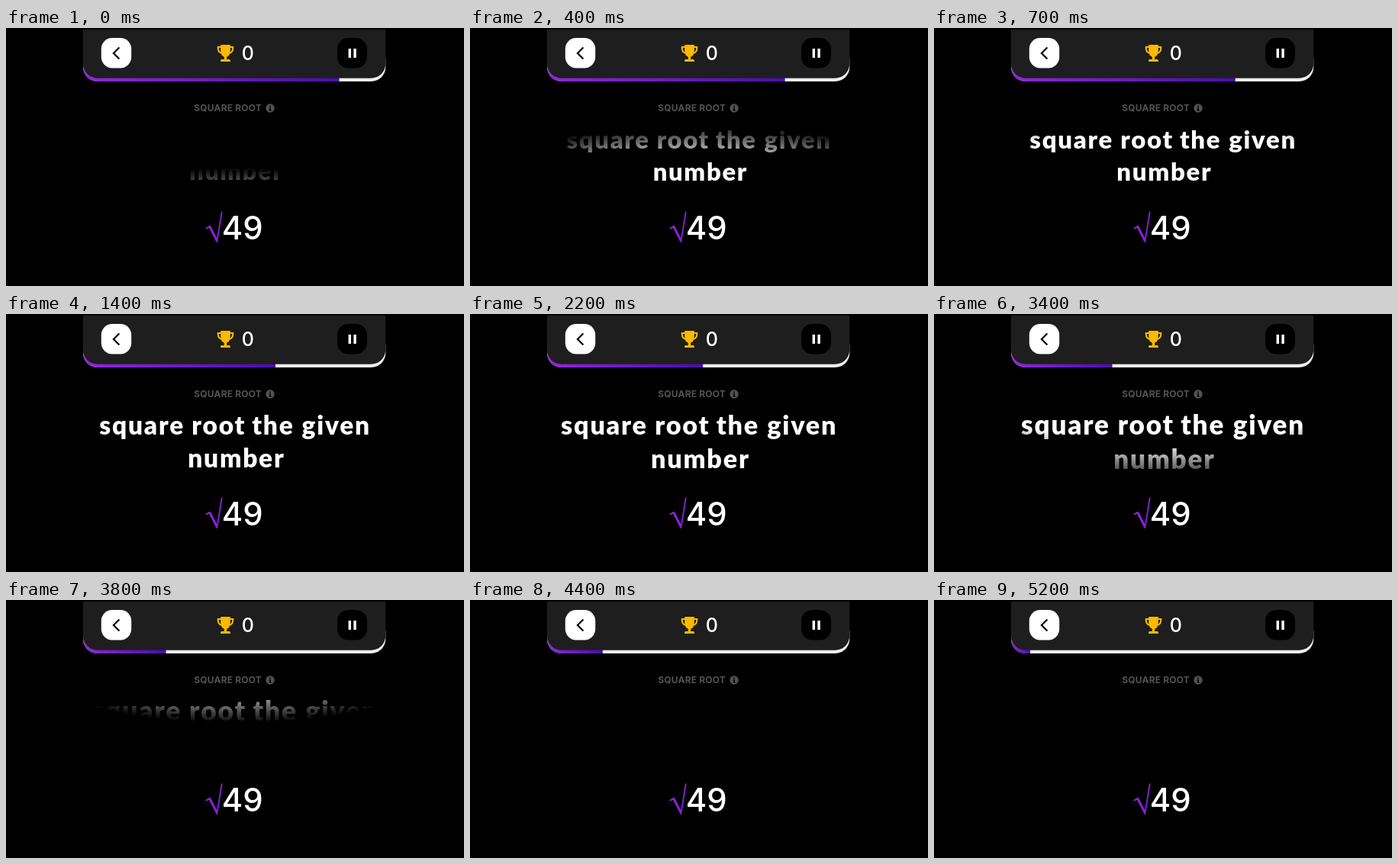
Write an HTML page that moves like this. It is 600 px wide and 338 px high and loops after 5300 ms.

```html
<!DOCTYPE html>
<html lang="en">
<head>
<meta charset="utf-8">
<title>Square root</title>
<style>
  html, body { margin: 0; width: 100%; height: 100%; overflow: hidden; background: #000; }
  svg { display: block; width: 100%; height: 100%; }
  text { font-family: Inter, "Liberation Sans", sans-serif; fill: #fff; text-anchor: middle; }
  .label { font-size: 12px; font-weight: 700; letter-spacing: .2px; fill: #525252; }
  .score { font-size: 25px; font-weight: 500; }
  .sum { font-size: 42px; font-weight: 500; }
  .prompt { font: 900 33px Lato, "Open Sans", sans-serif; letter-spacing: 1.7px; }
</style>
</head>
<body>
<svg viewBox="0 0 600 338">
  <defs>
    <linearGradient id="violet" gradientUnits="userSpaceOnUse" x1="101" y1="0" x2="437" y2="0">
      <stop offset="0" stop-color="#9326dc"/>
      <stop offset="1" stop-color="#4a0cae"/>
    </linearGradient>
    <linearGradient id="rootFill" x1="0" y1="0" x2="1" y2="1">
      <stop offset="0" stop-color="#9d2be6"/>
      <stop offset="1" stop-color="#7a1bd0"/>
    </linearGradient>
    <radialGradient id="spot" gradientUnits="userSpaceOnUse" cx="300" cy="983" r="800">
      <stop offset=".931" stop-color="#fff"/>
      <stop offset="1" stop-color="#fff" stop-opacity="0"/>
    </radialGradient>
    <mask id="wipe" maskUnits="userSpaceOnUse" x="0" y="0" width="600" height="338">
      <rect width="600" height="338" fill="url(#spot)"/>
    </mask>
    <clipPath id="barShape">
      <path d="M101 40H497.3V51A19 19 0 0 1 478.3 70H120A19 19 0 0 1 101 51Z"/>
    </clipPath>
  </defs>

  <rect width="600" height="338"/>

  <g clip-path="url(#barShape)">
    <rect x="101" y="40" width="397" height="30" fill="#eee"/>
    <rect id="bar" x="101" y="40" width="335.5" height="30" fill="url(#violet)"/>
  </g>
  <path d="M101 2H497.3V46.7A19 19 0 0 1 478.3 65.7H120A19 19 0 0 1 101 46.7Z" fill="#1e1e1e"/>

  <rect x="124.8" y="13" width="39.4" height="39.4" rx="14.3" fill="#fff"/>
  <path d="M148.4 25.4L140.9 33L148.4 40.6" fill="none" stroke="#000" stroke-width="2.2"/>

  <rect x="434" y="13" width="39" height="39.4" rx="14.5"/>
  <path d="M448.6 27h3.4v12h-3.4zM455.4 27h3.4v12h-3.4z" fill="#fff"/>

  <g fill="#fcb900">
    <path d="M281.2 22H293.8V29Q293.8 36.8 289.2 37.8V41H292.5Q294 41 294 44H281Q281 41 282.5 41H285.8V37.8Q281.2 36.8 281.2 29Z"/>
    <path d="M282 25H277.8V27Q278.2 32.3 283.2 33M293 25H297.2V27Q296.8 32.3 291.8 33" fill="none" stroke="#fcb900" stroke-width="2.1"/>
  </g>
  <text class="score" x="316.7" y="42.3">0</text>

  <text class="label" x="290.6" y="109.4">SQUARE ROOT</text>
  <circle cx="346" cy="105" r="5.7" fill="#525252"/>
  <path d="M345.2 101.6h1.7v1.6h-1.7zM344.5 104.2h2.4v3.1h.8v1.1h-3.2v-1.1h.8v-2h-.8z"/>

  <g mask="url(#wipe)"><g id="prompt"></g></g>

  <path d="M261.3 262L267.6 258.6L276.2 275L281.9 240.5H283.7L277.2 281H275.8L266 261.7L262 263.4Z" fill="url(#rootFill)"/>
  <text class="sum" x="309.7" y="277">49</text>
</svg>
<script>
  const LOOP = 5300, STEP = 100, SPEED = 0.153;
  const byId = id => document.getElementById(id);
  const bar = byId('bar'), violet = byId('violet'), spot = byId('spot'), prompt = byId('prompt');

  // word, centre x, baseline
  const words = [
    ['square', 179.3, 158], ['root', 278.3, 158], ['the', 348.3, 158],
    ['given', 429.8, 158], ['number', 301, 200]
  ];
  for (const [word, x, y] of words) {
    const el = document.createElementNS('http://www.w3.org/2000/svg', 'text');
    el.setAttribute('class', 'prompt');
    el.setAttribute('x', x + 0.8);
    el.setAttribute('y', y);
    el.textContent = word;
    prompt.append(el);
  }

  // The soft circle rises into view from below, later leaves through the top.
  const spotY = t => t < 2000 ? 983 - SPEED * t : -515 - SPEED * (t - 3000);

  function draw(now) {
    const t = Math.floor(now % LOOP / STEP) * STEP;
    const end = 436.5 - 0.0597 * t;
    bar.setAttribute('width', end - 101);
    violet.setAttribute('x2', end);
    spot.setAttribute('cy', spotY(t));
    const scale = (342 + 0.0083 * t) / 348;
    prompt.setAttribute('transform', `translate(300 152) scale(${scale}) translate(-300 -152)`);
  }

  function tick() {
    draw(performance.now());
    requestAnimationFrame(tick);
  }
  draw(0);
  requestAnimationFrame(tick);
</script>
</body>
</html>
```
